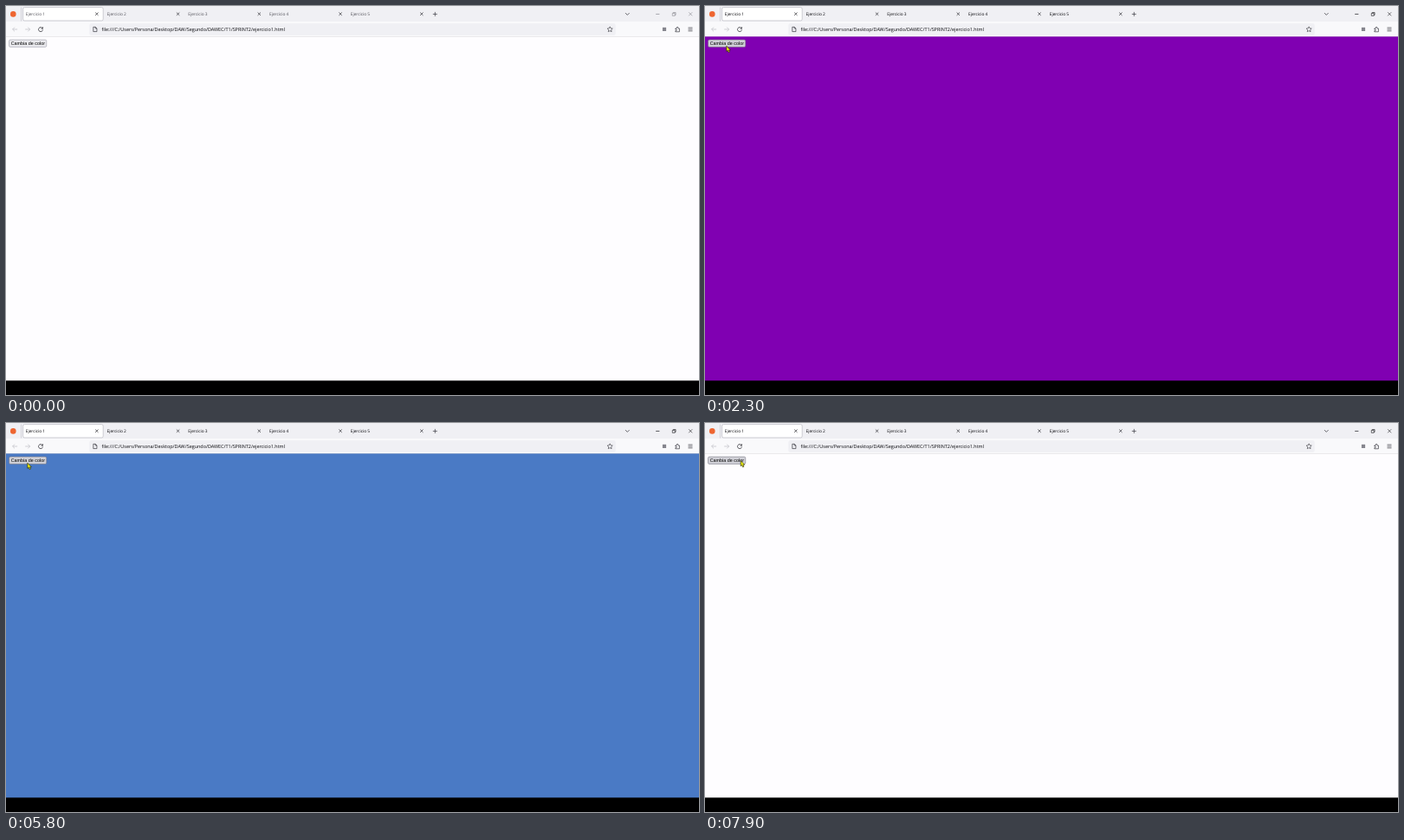
Recreate the animation shown at these times as an HTML page with a canvas. Size 800 by 450 pixels, loop 8000 ms.

```html
<!DOCTYPE html>
<html lang="es">
<head>
<meta charset="utf-8">
<title>Ejercicio 1</title>
<style>
html, body { margin: 0; width: 100%; height: 100%; overflow: hidden; background: #000; }
canvas { display: block; width: 800px; height: 450px; }
</style>
</head>
<body>
<canvas id="stage" width="800" height="450"></canvas>
<script>
const ctx = document.getElementById('stage').getContext('2d');
const LOOP = 8000, STEP = 100;
const UI = '"Open Sans", "Noto Sans", sans-serif';
const BUTTON_FONT = '"Liberation Sans", Arial, sans-serif';
const INK = '#2b2b32';

// [start time, page colour]
const PAGES = [
  [0, '#fefdff'], [1300, '#59b0df'], [2300, '#8000b2'], [3300, '#f33a18'],
  [4300, '#bfe1ba'], [5800, '#4a7ac5'], [7200, '#fefdff']
];
const PRESSES = [1200, 2200, 3200, 4200, 5700];

// [time, x, y] of the pointer tip
const PATH = [
  [1200, 26.6, 42.8], [1300, 26.6, 42.8], [1700, 24.8, 46.2], [6100, 24.8, 46.2],
  [6900, 39.5, 27], [7200, 39.5, 27], [7900, 41.2, 43.6]
];

function rect(x, y, w, h, fill) {
  ctx.fillStyle = fill;
  ctx.fillRect(x, y, w, h);
}

function box(x, y, w, h, r, fill, stroke, width = 0.6) {
  ctx.beginPath();
  ctx.roundRect(x, y, w, h, r);
  if (fill) { ctx.fillStyle = fill; ctx.fill(); }
  if (stroke) { ctx.strokeStyle = stroke; ctx.lineWidth = width; ctx.stroke(); }
}

function dot(x, y, r, fill) {
  ctx.beginPath();
  ctx.arc(x, y, r, 0, Math.PI * 2);
  ctx.fillStyle = fill;
  ctx.fill();
}

// Strokes SVG path data placed at x, y
function icon(x, y, d, color, width = 0.7) {
  ctx.save();
  ctx.translate(x, y);
  ctx.strokeStyle = color;
  ctx.lineWidth = width;
  ctx.stroke(new Path2D(d));
  ctx.restore();
}

function text(s, x, y, size, color, family = UI) {
  ctx.font = size + 'px ' + family;
  ctx.fillStyle = color;
  ctx.fillText(s, x, y);
}

function cross(x, y, r, color, width) {
  icon(x, y, `M${-r} ${-r}L${r} ${r}M${r} ${-r}L${-r} ${r}`, color, width);
}

function starPath(r) {
  let d = '';
  for (let i = 0; i < 10; i++) {
    const a = -Math.PI / 2 + i * Math.PI / 5, q = i % 2 ? r * 0.5 : r;
    d += (i ? 'L' : 'M') + q * Math.cos(a) + ' ' + q * Math.sin(a);
  }
  return d + 'Z';
}

function drawTabs(focused) {
  const label = focused ? '#08080c' : '#55545c';
  const control = focused ? '#16161a' : '#87878e';
  rect(0, 0, 800, 18, '#f0f0f4');
  dot(8.3, 9.4, 3.3, '#ee6530');
  rect(17, 1.5, 0.7, 16, '#c9c9d0');
  box(19.6, 1.6, 92.6, 15.4, 1.8, '#ffffff', '#b9b9c2', 0.7);
  for (let i = 0; i < 5; i++) {
    const x = 22.8 + i * 93.75;
    text('Ejercicio ' + (i + 1), x, 11.2, 4.8, label);
    cross(x + 82, 9.2, 1.7, INK, 0.7);
  }
  icon(495.3, 9.4, 'M-2.5 0H2.5M0 -2.5V2.5', INK, 0.65);
  icon(717.3, 9.2, 'M-2.3 -1.1L0 1.2L2.3 -1.1', INK);
  icon(752.3, 9.4, 'M-2.1 0H2.1', control);
  icon(771.2, 9.4, 'M-1.9 -1H1V1.9H-1.9ZM-1 -1V-1.9H1.9V1H1', control, 0.6);
  cross(790.2, 9.3, 2, control, 0.6);
}

function drawToolbar(reload) {
  rect(0, 18, 800, 17, '#f9f9fb');
  icon(10.3, 27, 'M2.8 0H-2.7M-0.3 -2.4L-2.7 0L-0.3 2.4', '#bdbdc3');
  icon(25, 27, 'M-2.8 0H2.7M0.3 -2.4L2.7 0L0.3 2.4', '#bdbdc3');
  if (reload) box(32.5, 20.4, 15.4, 13.2, 1.8, reload);
  icon(40, 27.1, 'M2 -1.5A2.5 2.5 0 1 0 2.5 0.4M2.5 -2.8V-0.9H0.6', INK, 0.75);

  box(96.3, 20.3, 607.4, 13.4, 1.8, '#f0f0f4');
  icon(102.8, 27, 'M-2 -2.7H0.5L2.1 -1.1V2.6H-2ZM0.4 -2.6V-1H2', INK, 0.65);
  text('file:///C:/Users/Persona/Desktop/DAW/Segundo/DAWEC/T1/SPRINT2/ejercicio1.html',
    110.4, 29, 5.45, '#08080c');
  icon(697.2, 27.1, starPath(3.2), INK, 0.6);

  box(757.9, 24.8, 4.2, 4.2, 0, '#85858d');
  icon(775.1, 27.3, 'M-2.3 -1.3H-0.9V-2.1A0.9 0.9 0 0 1 0.9 -2.1V-1.3H2.3V2.5H-2.3V1.3H-1.6A0.8 0.8 0 0 0 -1.6 -0.3H-2.3Z', INK, 0.65);
  icon(790, 27, 'M-2.5 -1.9H2.5M-2.5 0H2.5M-2.5 1.9H2.5', INK, 0.65);
}

function drawPage(color, button) {
  const [fill, border] = {
    idle: ['#e9e9ed', '#8f8f9d'],
    hover: ['#d0d0d7', '#676774'],
    down: ['#b1b1b9', '#484851']
  }[button];
  rect(0, 35, 800, 399, color);
  rect(0, 35, 800, 0.42, '#cccccf');
  rect(0, 433.35, 800, 16.65, '#000');
  box(3.55, 39.05, 43.2, 8.4, 1.5, fill, border, 0.5);
  text('Cambia de color', 5.7, 45.4, 5.4, '#000', BUTTON_FONT);
}

function pointerAt(t) {
  if (t < PATH[0][0]) return null;
  let i = 0;
  while (i < PATH.length - 2 && t >= PATH[i + 1][0]) i++;
  const [t0, x0, y0] = PATH[i], [t1, x1, y1] = PATH[i + 1];
  const p = Math.min(1, (t - t0) / (t1 - t0));
  const e = p * p * (3 - 2 * p);
  return { x: x0 + (x1 - x0) * e, y: y0 + (y1 - y0) * e };
}

function drawPointer({ x, y }) {
  const arrow = new Path2D('M0 0V6.3L1.4 5.1L2.5 7.5L3.7 6.9L2.7 4.7H4.6Z');
  ctx.save();
  ctx.translate(x, y);
  ctx.fillStyle = '#eef010';
  ctx.fill(arrow);
  ctx.strokeStyle = '#1c1c00';
  ctx.lineWidth = 0.6;
  ctx.stroke(arrow);
  ctx.restore();
}

function draw(t) {
  const pointer = pointerAt(t);
  const color = PAGES.filter(p => p[0] <= t).pop()[1];
  const overButton = pointer
    ? pointer.x > 3 && pointer.x < 47 && pointer.y > 39 && pointer.y < 48
    : t >= 900;
  const overReload = pointer && pointer.x > 32 && pointer.y > 20 && pointer.y < 34;
  const button = PRESSES.includes(t) ? 'down' : overButton ? 'hover' : 'idle';
  const reload = overReload ? (t === 7100 ? '#cfcfd8' : '#e0e0e6') : null;

  ctx.clearRect(0, 0, 800, 450);
  drawTabs(t >= 1200);
  drawToolbar(reload);
  drawPage(color, button);
  if (pointer) drawPointer(pointer);
}

ctx.textRendering = 'geometricPrecision';
ctx.lineJoin = 'round';
const start = performance.now();

function tick() {
  const t = (performance.now() - start) % LOOP;
  draw(Math.floor(t / STEP) * STEP);
  requestAnimationFrame(tick);
}
tick();
</script>
</body>
</html>
```
